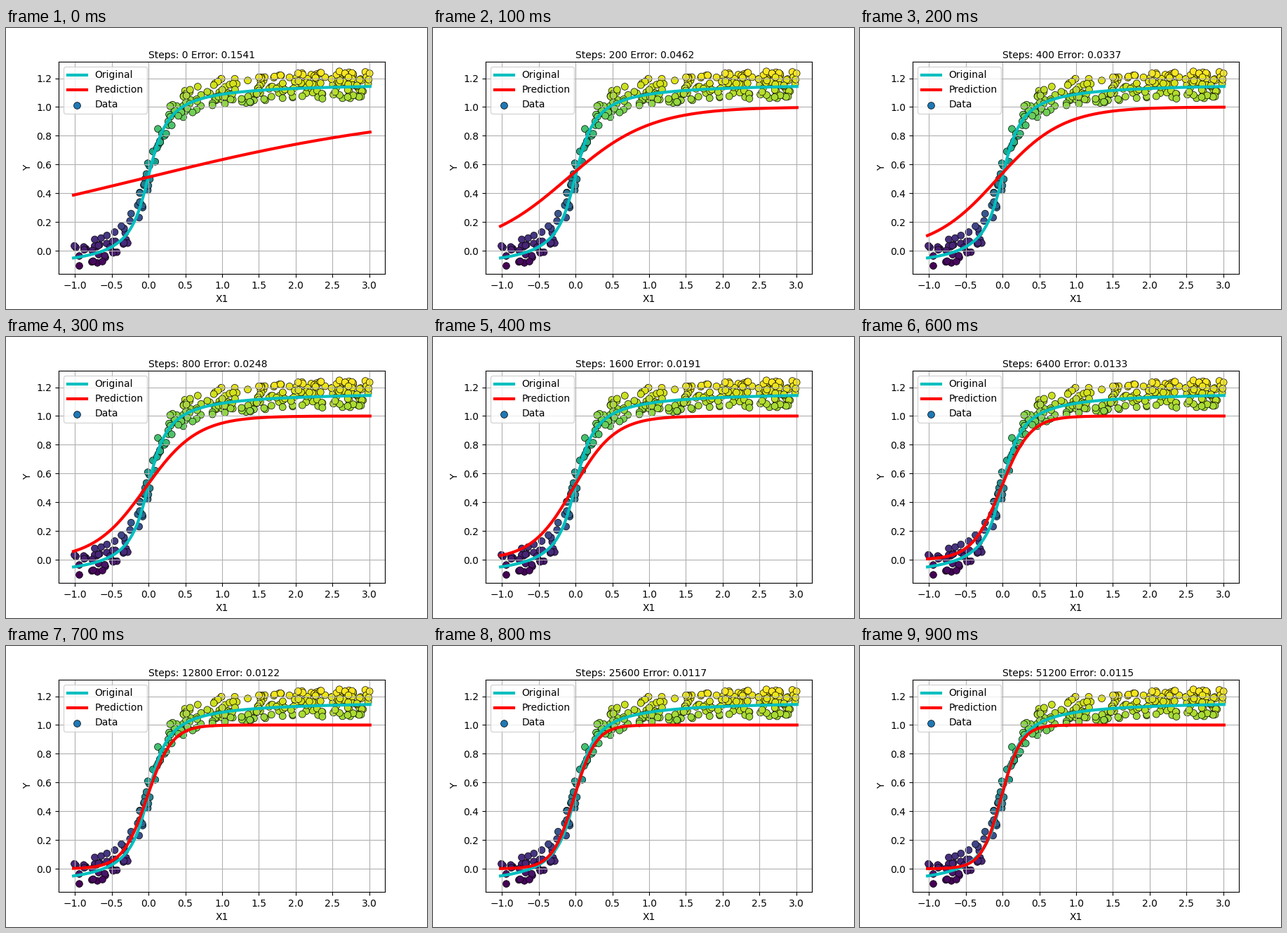
Animation, 600 px wide and 400 px high, one loop 1000 ms. Source, as a matplotlib script:

```python
import numpy as np
import matplotlib.pyplot as plt
from matplotlib.animation import FuncAnimation

XLIM, YLIM = (-1.2212, 3.2118), (-0.1609, 1.3151)
X_MIN, X_MAX = -1.02, 3.01
LEARNING_RATE = 0.1

STEPS = [0] + [200 * 2**k for k in range(9)]
ERRORS = "0.1541 0.0462 0.0337 0.0248 0.0191 0.0154 0.0133 0.0122 0.0117 0.0115".split()


def true_curve(x):
    return 0.52 + 0.414 * np.arctan(5 * x)


def predict(x, weight, bias):
    return 1 / (1 + np.exp(-(weight * x + bias)))


def train(weight=0.5, bias=0.05):
    """Fit by gradient descent on the squared error; return (weight, bias) at STEPS."""
    x = np.linspace(X_MIN, X_MAX, 160)
    y = true_curve(x)
    snapshots = []
    for step in range(STEPS[-1] + 1):
        if step in STEPS:
            snapshots.append((weight, bias))
        p = predict(x, weight, bias)
        slope = 2 * LEARNING_RATE / len(x) * (p - y) * p * (1 - p)
        weight -= slope @ x
        bias -= slope.sum()
    return snapshots


def make_samples(n=280):
    rng = np.random.default_rng(4)
    x = rng.uniform(X_MIN, X_MAX, n)
    return x, true_curve(x) + rng.uniform(-0.08, 0.11, n)


plt.rcParams["font.family"] = "DejaVu Sans"
fig, ax = plt.subplots(figsize=(6, 4), dpi=100)
fig.subplots_adjust(left=0.125, right=0.9, bottom=0.125, top=0.88)

dots = dict(s=50, edgecolors="k", linewidths=0.5)
sample_x, sample_y = make_samples()
ax.scatter(sample_x, sample_y, c=sample_y, cmap="viridis", **dots)

grid_x = np.linspace(X_MIN, X_MAX, 400)
ax.plot(grid_x, true_curve(grid_x), "c", lw=3, label="Original")
prediction, = ax.plot([], [], "r", lw=3, label="Prediction")
ax.scatter([], [], c="C0", label="Data", **dots)

ax.set(xlim=XLIM, ylim=YLIM, xlabel="X1", ylabel="Y")
ax.grid(True)
ax.legend(loc="upper left")
caption = ax.text(0, 1.338, "", fontsize=10)

snapshots = train()


def update(i):
    prediction.set_data(grid_x, predict(grid_x, *snapshots[i]))
    caption.set_text(f"Steps: {STEPS[i]} Error: {ERRORS[i]}")
    return prediction, caption


anim = FuncAnimation(fig, update, frames=len(STEPS), interval=100, repeat=True)
plt.show()
```
